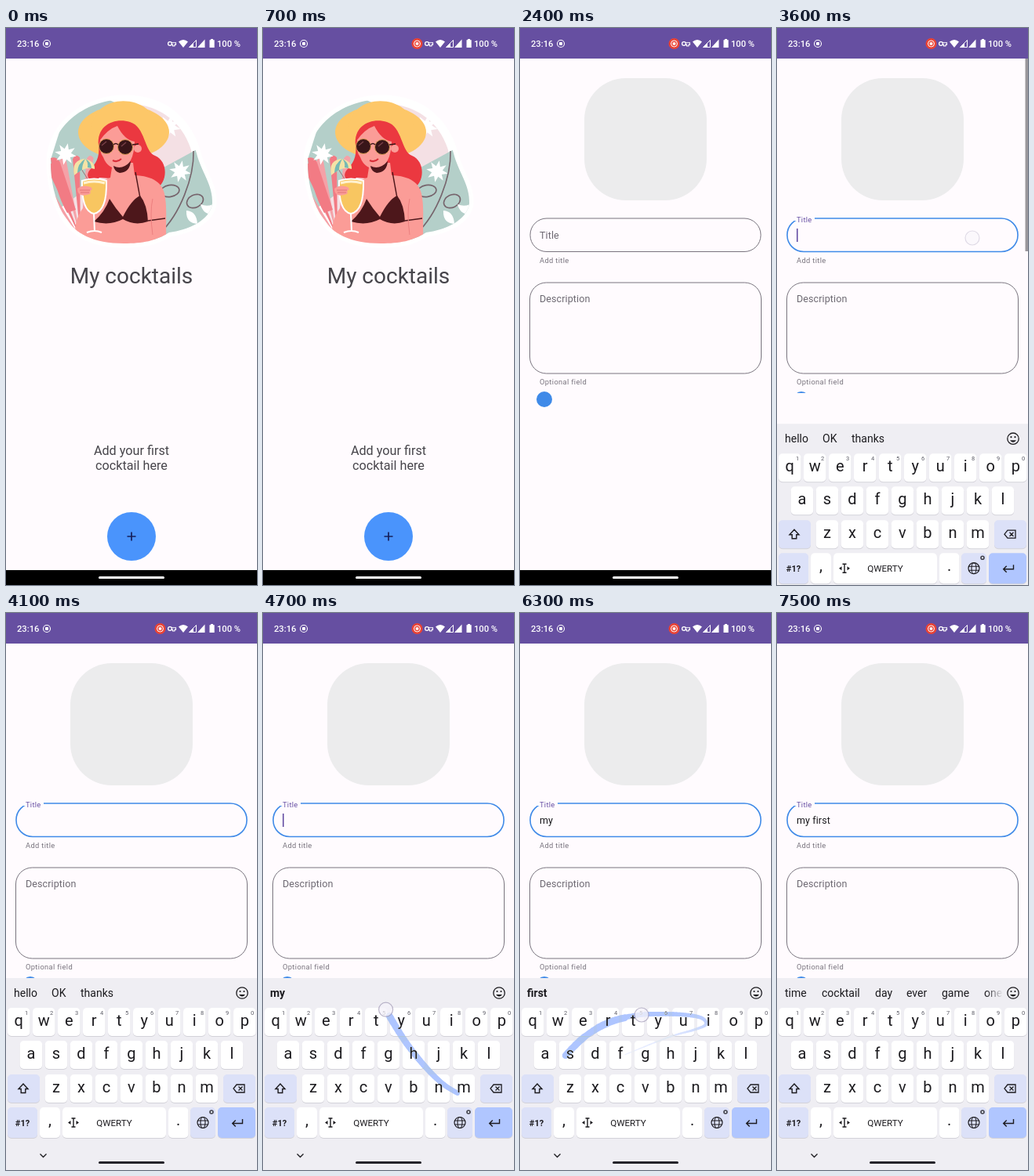
An HTML page with a canvas that plays this animation: 320 px wide and 711 px high, repeating every 8000 ms.

```html
<!DOCTYPE html>
<html lang="en">
<head>
<meta charset="utf-8">
<title>Cocktail list</title>
<style>
html, body { margin: 0; width: 100%; height: 100%; overflow: hidden; background: #fffbfe; }
canvas { display: block; width: 320px; height: 711px; }
</style>
</head>
<body>
<canvas id="stage"></canvas>
<script>
const W = 320, H = 711, LOOP = 8000, STEP = 100;
const canvas = document.getElementById('stage');
const ctx = canvas.getContext('2d');
const ratio = window.devicePixelRatio || 1;
canvas.width = W * ratio;
canvas.height = H * ratio;

const INK = '#1c1b1f', GREY = '#79747e', BLUE = '#3f8ae8', PURPLE = '#6750a4', PAPER = '#fffbfe', BOARD = '#efeef3';
const clamp = v => Math.max(0, Math.min(1, v));
const within = (t, a, b) => t >= a && t < b;

function paint(shape, fill, stroke, width = 1) {
  if (fill) { ctx.fillStyle = fill; ctx.fill(shape); }
  if (stroke) { ctx.strokeStyle = stroke; ctx.lineWidth = width; ctx.stroke(shape); }
}
const path = (d, ...style) => paint(new Path2D(d), ...style);
function oval(x, y, rx, ry, ...style) {
  const p = new Path2D();
  p.ellipse(x, y, rx, ry, 0, 0, Math.PI * 2);
  paint(p, ...style);
}
const disc = (x, y, r, ...style) => oval(x, y, r, r, ...style);
function box(x, y, w, h, r, ...style) {
  const p = new Path2D();
  p.roundRect(x, y, w, h, r);
  paint(p, ...style);
}
function text(str, x, y, size, color, { align = 'left', weight = 400, spacing = 0 } = {}) {
  ctx.font = `${weight} ${size}px Roboto, sans-serif`;
  ctx.textAlign = align;
  ctx.letterSpacing = spacing + 'px';
  ctx.fillStyle = color;
  ctx.fillText(str, x, y);
}
function star(x, y, r) {
  const p = new Path2D();
  for (let i = 0; i < 16; i++) {
    const a = i * Math.PI / 8, d = i % 2 ? r * 0.5 : r;
    p.lineTo(x + d * Math.cos(a + 0.2), y + d * Math.sin(a + 0.2));
  }
  paint(p, '#fff');
}

function statusBar(t) {
  box(0, 0, W, 39, 0, '#664fa1');
  text('23:16', 14, 24, 11.2, '#fff', { weight: 500 });
  disc(52, 20, 4.5, null, '#fff', 1.1);
  box(50, 18, 4, 4, 1, '#fff');
  const grow = clamp(t / 400);
  if (grow) {
    disc(196.5, 20, 7 * grow, '#ea4335');
    disc(196.5, 20, 4 * grow, null, '#fff');
    box(196.5 - 1.8 * grow, 20 - 1.8 * grow, 3.6 * grow, 3.6 * grow, 1, '#fff');
  }
  disc(209, 20, 2.4, null, '#fff', 1.3);
  path('M211 18.8 H216.5 V21.4 H215 V23 H212.5 V21.4 H211', null, '#fff', 1.1);
  path('M220 17.5 Q226 12.5 232 17.5 L226 25 Z', '#fff');
  path('M242.5 15.5 V24.5 H233.5 Z', null, '#fff', 1);
  path('M239 19 V24.5 H233.5 Z M253.5 14.5 V25 H244 Z', '#fff');
  path('M261 14 H264 V15.3 H265.7 V25 H259.5 V15.3 H261 Z', '#fff');
  text('100 %', 269, 24, 11.2, '#fff', { weight: 500 });
}

function navBar() {
  box(0, 692, W, 19, 0, '#000');
  box(118, 700, 84, 3, 1.5, '#fff');
}

const BLOB = 'M57 170 C58 122 105 90 154 91 C204 92 233 122 243 160 C249 184 264 200 263 224 C260 246 232 258 208 261 C190 272 175 275 150 275 C112 275 87 263 73 238 C62 217 57 197 57 170 Z';

function illustration() {
  path(BLOB, '#f4e0e4', '#fff', 11);
  ctx.save();
  ctx.clip(new Path2D(BLOB));
  path('M50 190 L72 120 L116 85 L150 100 L110 200 L55 240 Z', '#b4cfc9');
  path('M190 184 L245 154 L270 195 V270 H170 Z', '#b4cfc9');
  for (let i = 0; i < 6; i++) {
    const a = -1.95 + i * 0.2;
    const x = 96 + 88 * Math.cos(a - 0.5), y = 256 + 92 * Math.sin(a - 0.5);
    path(`M95 268 L${x - 4} ${y + 3} Q${x} ${y - 5} ${x + 5} ${y + 1} Z`, i % 2 ? '#f5a1a7' : '#f27b84');
  }
  path('M57 166 Q65 163 69 172 L89 232 L78 236 Q62 208 57 166 Z', '#f27b84');
  star(76, 161, 14);
  star(208, 126, 15);
  star(222, 183, 14);
  path('M239 157 C240 190 222 238 196 262', null, '#76646c', 1.6);
  ctx.save();
  ctx.translate(209, 208);
  ctx.rotate(-0.15);
  oval(0, 0, 12, 7.5, null, '#76646c', 1.6);
  ctx.restore();
  ctx.save();
  ctx.translate(241, 221);
  ctx.rotate(-0.45);
  oval(0, 0, 11, 8, null, '#76646c', 1.6);
  ctx.restore();
  path('M230 233 Q243 234 244 250 Q229 249 230 233 Z M248 225 Q257 229 266 224 V237 Q252 240 248 225 Z', '#fff');

  const skin = '#fb9c97', red = '#eb3840', dark = '#4d171b';
  oval(150, 133, 58, 34, '#fdc768');
  path('M109 130 C110 80 190 82 193 130 Z', '#fdc768');
  path('M118 150 C115 123 140 114 158 120 C178 126 176 158 190 163 C207 170 207 198 190 206 C175 214 160 203 160 194 L119 191 C110 201 99 190 107 181 C114 174 120 165 118 150 Z', red);
  path('M88 282 C86 252 90 238 103 224 C105 207 112 198 133 191 L136 172 H162 L164 188 C187 189 201 197 203 217 C206 237 202 258 206 282 Z', skin);
  path('M120 143 Q130 129 142 125 Q151 143 164 145 Q163 174 147 180 Q130 181 124 165 Q118 157 120 143 Z', skin);
  disc(168, 154, 5, skin);
  path('M137 176 Q148 182 159 170 Q158 184 145 185 Q138 183 137 176 Z', dark);
  path('M136 169 Q142 172 147 167', null, '#d92f3a', 2);
  disc(128, 151, 9.5, '#391519', '#d89a55', 1);
  disc(152, 152, 9.5, '#391519', '#d89a55', 1);
  path('M137 149 Q140 146 143 149 M161 149 L169 148', null, '#391519', 1.3);
  path('M122 150 L128 145 M147 151 L153 146', null, '#784047', 1.5);
  path('M165 184 L171 217', null, dark, 1.4);
  path('M132 218 Q140 231 149 241 Q160 219 171 214 Q180 225 181 247 Q164 253 149 244 Q132 253 112 247 Q126 235 132 218 Z', dark);
  path('M181 246 L203 243', null, dark, 1.3);
  path('M187 218 Q183 235 187 264', null, '#ec7f7f', 1);
  path('M91 172 L108 199', null, '#9b7074', 1);
  path('M87 188 Q83 168 101 167 Q114 171 113 180 Q100 176 87 188 Z', '#f4e3a6');
  path('M91 185 Q91 173 101 167 Q97 175 97 181 Z M104 178 Q105 171 101 167 Q109 171 109 179 Z', '#76b9b4');
  path('M97 195 Q112 190 128 195 Q129 234 112 237 Q96 234 97 195 Z', '#f8c661', '#fff', 2);
  path('M99 198 Q112 194 126 198', null, '#fff2cf', 3);
  path('M112 237 L113 260 M103 261 Q113 257 122 261', null, '#fff', 2);
  path('M91 205 Q98 199 108 203 Q112 206 107 208 Q110 212 103 213 Q91 216 91 205 Z', skin);
  path('M94 207 H107 M95 210 H106', null, '#d96b70', 0.8);
  ctx.restore();
}

function touch(x, y, alpha = 1) {
  ctx.save();
  ctx.globalAlpha = alpha;
  disc(x, y, 9, 'rgba(244,242,249,.75)', 'rgba(135,125,160,.55)', 1.2);
  ctx.restore();
}

function home(t) {
  illustration();
  text('My cocktails', 160, 326, 28, '#47454b', { align: 'center' });
  text('Add your first', 160, 545, 16.2, '#47454b', { align: 'center' });
  text('cocktail here', 160, 564, 16.2, '#47454b', { align: 'center' });
  disc(160, 649, 31, '#4a94fc');
  path('M154.5 649 H165.5 M160 643.5 V654.5', null, '#17205c', 1.7);
  if (t >= 2100) {
    ctx.save();
    const button = new Path2D();
    button.arc(160, 649, 31, 0, 7);
    ctx.clip(button);
    disc(164, 648, 11 + (t - 2100) * 0.13, 'rgba(200,215,255,.35)');
    ctx.restore();
    if (t < 2300) touch(164, 648);
  }
  navBar();
}

const CURSOR_ON = [[3500, 4000], [4500, 5900], [6600, 7100]];

function form(t) {
  const focused = t >= 3500;
  box(82, 64, 156, 156, 53, '#ececed');
  box(13, 243, 294, 42.5, 21, null, focused ? BLUE : GREY, focused ? 1.6 : 1);
  if (focused) {
    box(22, 240, 26, 6, 0, PAPER);
    text('Title', 25, 248, 9.33, PURPLE, { spacing: 0.3 });
    const typed = t < 5000 ? '' : t < 6600 ? 'my' : 'my first';
    text(typed, 25, 269, 12.5, INK, { spacing: 0.1 });
    if (CURSOR_ON.some(([a, b]) => within(t, a, b))) {
      box(25 + ctx.measureText(typed).width, 256, 1.6, 17, 0, PURPLE);
    }
  } else {
    text('Title', 25, 269, 12.5, '#6d6972', { spacing: 0.1 });
  }
  text('Add title', 25, 299.5, 9.33, GREY, { spacing: 0.35 });
  box(12.5, 325, 295, 116, 21, null, GREY);
  text('Description', 25, 349.5, 12.5, '#6d6972', { spacing: 0.1 });
  text('Optional field', 25, 455, 9.33, GREY, { spacing: 0.35 });
  disc(31, 474, 10, BLUE);
  if (within(t, 3600, 4000)) {
    ctx.globalAlpha = clamp((4000 - t) / 300);
    box(316.5, 39, 3.5, 246, 0, '#99969b');
    ctx.globalAlpha = 1;
  }
  if (!focused) navBar();
  if (within(t, 3500, 3700)) touch(249, 268, t < 3600 ? 1 : 0.45);
}

function key(x, y, w, label, color = '#fff', h = 36) {
  box(x, y + 1, w, h, 5, '#d3d2d9');
  box(x, y, w, h, 5, color);
  text(label, x + w / 2, y + 23, 20, INK, { align: 'center' });
}

function suggestions(t) {
  const words = (list) => list.forEach(([word, x]) => text(word, x, 490, 14, INK));
  const best = word => text(word, 9, 490, 14, INK, { weight: 700 });
  if (t < 4400) words([['hello', 10], ['OK', 58], ['thanks', 95]]);
  else if (within(t, 4600, 5300)) best('my');
  else if (within(t, 6100, 6600)) best('first');
  else if (t >= 6600) {
    words([['time', 10], ['cocktail', 57], ['day', 125], ['ever', 165], ['game', 210], ['one', 264]]);
    const fade = ctx.createLinearGradient(266, 0, 288, 0);
    fade.addColorStop(0, 'rgba(239,238,243,0)');
    fade.addColorStop(1, BOARD);
    box(266, 474, 24, 24, 0, fade);
  }
  disc(301, 485, 7.2, null, INK, 1.3);
  disc(298.5, 483, 1.1, INK);
  disc(303.5, 483, 1.1, INK);
  path('M297 487 Q301 492 305 487 Z', INK);
}

function keyboard(t) {
  // Slides up with a cubic ease-out
  const drop = 245 * (1 - clamp((t - 3488) / 245)) ** 3;
  ctx.save();
  ctx.translate(0, drop < 1 ? 0 : drop);
  box(0, 466, W, 300, 0, BOARD);
  suggestions(t);
  const soft = '#dce1f8';
  [...'qwertyuiop'].forEach((c, i) => {
    key(2 + 32 * i, 504, 28.5, c);
    text((i + 1) % 10, 26 + 32 * i, 512.5, 7.5, '#5b5b66', { align: 'center' });
  });
  [...'asdfghjkl'].forEach((c, i) => key(17.7 + 32 * i, 546, 28.5, c));
  [...'zxcvbnm'].forEach((c, i) => key(49.7 + 32 * i, 589, 28.5, c));
  key(2, 589, 41, '', soft);
  key(277, 589, 41, '', soft);
  key(2, 631, 38, '', soft, 39);
  key(43, 631, 26, ',', '#fff', 39);
  key(72, 631, 132, '', '#fff', 39);
  key(207, 631, 25.5, '.', '#fff', 39);
  key(235, 631, 32, '', soft, 39);
  key(270, 631, 48, '', '#b0c6ff', 39);

  path('M22 601 L28 607.5 H24.8 V612.5 H19.2 V607.5 H16 Z', null, INK, 1.4);
  path('M294 602 H304 V612 H294 L290 607 Z M296.5 604.5 L301.5 609.5 M301.5 604.5 L296.5 609.5', null, INK, 1.3);
  text('#1?', 21, 654.5, 11, INK, { align: 'center', weight: 700 });
  text('QWERTY', 138, 654.5, 11.6, INK, { align: 'center' });
  path('M83.5 645 H88.5 M86 645 V656 M83.5 656 H88.5', null, INK, 1.4);
  path('M82.5 648 L79 650.5 L82.5 653 Z M89.5 648 L93 650.5 L89.5 653 Z', INK);
  disc(251, 650.5, 7, null, INK, 1.2);
  oval(251, 650.5, 3, 7, null, INK, 1.1);
  path('M244.8 648 H257.2 M244.8 653 H257.2', null, INK, 1.1);
  disc(262, 637, 2, null, '#44444d', 1.6);
  path('M301.5 646 V651.5 H289 M292.7 647.5 L288.7 651.5 L292.7 655.5', null, INK, 1.4);
  path('M43.5 690.5 L47.5 694.5 L51.5 690.5', null, INK, 1.3);
  if (drop < 1) box(118, 700, 84, 3, 1.5, '#25242a');
  ctx.restore();
}

// Finger paths as [time, x, y]
const SWIPES = [
  [[4350, 248, 613], [4440, 228, 600], [4530, 205, 577], [4620, 180, 545], [4695, 157, 507], [4800, 160, 508]],
  [[5390, 126, 567], [5500, 188, 542], [5620, 222, 532], [5720, 237, 525], [5800, 229, 516], [5900, 195, 512],
   [6000, 145, 514], [6080, 100, 528], [6150, 58, 565], [6210, 82, 541], [6260, 118, 521], [6300, 155, 513], [6400, 151, 515]]
];

function pointAt(points, t) {
  const last = points.length - 1;
  if (t >= points[last][0]) return points[last].slice(1);
  const i = Math.max(0, points.findIndex(p => p[0] > t) - 1);
  const at = n => points[Math.max(0, Math.min(last, n))];
  const u = clamp((t - at(i)[0]) / (at(i + 1)[0] - at(i)[0]));
  // Catmull-Rom between the neighbouring points
  return [1, 2].map(k => {
    const [a, b, c, d] = [-1, 0, 1, 2].map(n => at(i + n)[k]);
    return b + u * ((c - a) + u * ((2 * a - 5 * b + 4 * c - d) + u * (3 * b - a - 3 * c + d))) / 2;
  });
}

function swipe(points, t) {
  const start = points[0][0], end = points[points.length - 1][0];
  if (t < start || t > end + 300) return;
  const released = clamp((t - end) / 300), life = 900, slice = 10;
  ctx.save();
  ctx.lineCap = 'round';
  ctx.globalCompositeOperation = 'darken';
  const head = Math.min(end, t - 25);
  for (let s = Math.max(start, t - life); s < head; s += slice) {
    const fresh = (1 - (t - s) / life) * (1 - released);
    if (fresh <= 0) continue;
    const pale = clamp(1 - fresh * 1.8);
    const [x1, y1] = pointAt(points, s), [x2, y2] = pointAt(points, Math.min(head, s + slice));
    ctx.strokeStyle = `rgb(${174 + 62 * pale},${197 + 43 * pale},255)`;
    ctx.lineWidth = 1 + 8 * fresh;
    ctx.beginPath();
    ctx.moveTo(x1, y1);
    ctx.lineTo(x2, y2);
    ctx.stroke();
  }
  ctx.restore();
  if (t <= end + 100) touch(...pointAt(points, t), t > end ? 0.45 : 1);
}

function draw(t) {
  ctx.setTransform(ratio, 0, 0, ratio, 0, 0);
  box(0, 0, W, H, 0, PAPER);
  if (t < 2400) {
    home(t);
  } else {
    form(t);
    if (t >= 3600) {
      box(0, 466, W, 245, 0, PAPER);
      keyboard(t);
    }
    SWIPES.forEach(points => swipe(points, t));
  }
  statusBar(t);
}

const began = performance.now();
function tick() {
  const time = (performance.now() - began) % LOOP;
  draw(Math.floor(time / STEP) * STEP);
  requestAnimationFrame(tick);
}
tick();
</script>
</body>
</html>
```
